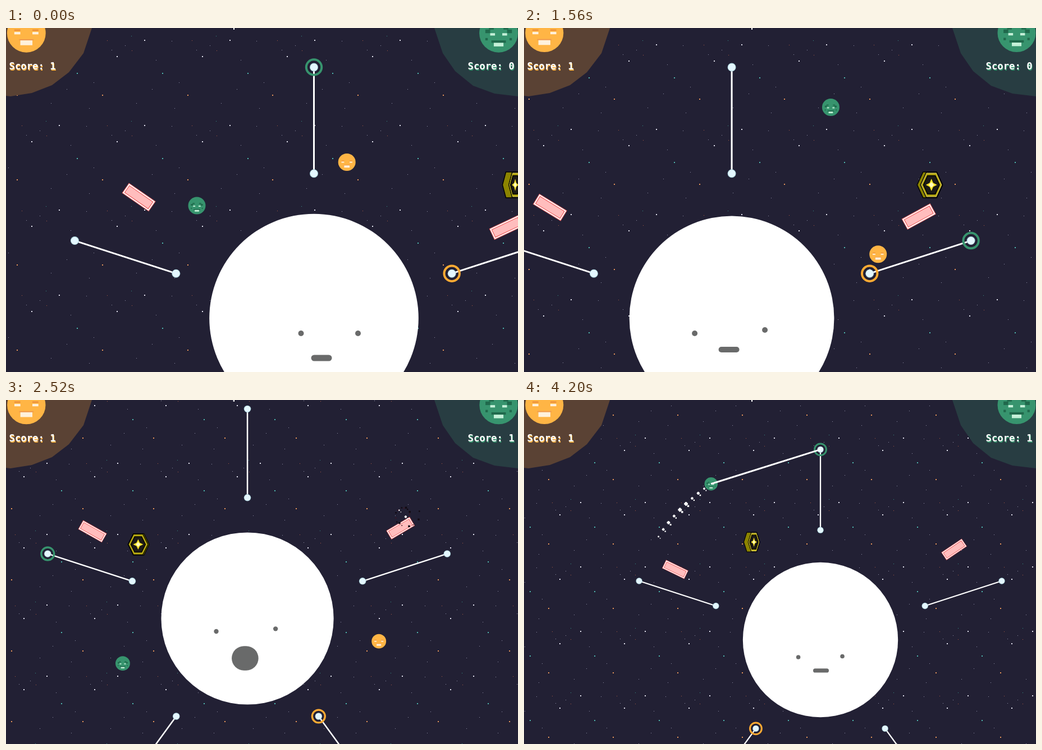
These frames come from a looping animation (912x614 px, 4240 ms). An HTML page with a canvas:

```html
<!DOCTYPE html>
<html lang="en">
<head>
<meta charset="utf-8">
<title>Planet swing</title>
<style>
html, body { margin: 0; width: 100%; height: 100%; overflow: hidden; background: #222034; }
canvas { display: block; width: 912px; height: 614px; }
</style>
</head>
<body>
<canvas id="stage" width="912" height="614"></canvas>
<script>
const ctx = document.getElementById('stage').getContext('2d');
const W = 912, H = 614, LOOP = 4240, STEP = 40;
const ORANGE = '#ffb545', GREEN = '#37946e', INK = '#696a6a';
const SCORED = 2, DIED = 2.1;
const rad = deg => deg * Math.PI / 180;
const polar = (r, deg) => [r * Math.cos(rad(deg)), r * Math.sin(rad(deg))];

// Times in seconds; the world origin is the planet's centre.
const CAMERA = [ // t, x, y, zoom
  [0, -92.5, -211, 1], [.56, -25.5, -211, 1], [1.08, 52, -211, 1],
  [2.04, 101.5, -211, 1], [2.52, 31.1, -99.4, .835], [3, -18, -84, .779],
  [3.52, -71.3, -95.1, .757], [4.2, -95, -159.6, .758], [4.24, -96, -163, .758]
];
const FLIGHT = [
  [0, -208.5, -201], [.28, -172.5, -230.6], [.56, -131.5, -254], [.66, -120, -303],
  [.8, -91, -332], [1.08, 1, -380], [1.3, 85, -420], [1.58, 183, -372],
  [2.04, 326.5, -228.5], [2.1, 343, -212]
];
const RESPAWN = [
  [2.1, -238, 154], [2.52, -266, 96], [2.8, -279, 50], [3.02, -292, 30],
  [3.12, -321, 1], [3.3, -372, -60], [3.52, -420, -145], [3.76, -376, -250],
  [4.2, -257, -367], [4.24, -247, -372]
];
const calm = [-23, 27, 78.5, 27, 13.5, 71, 18.5, 5.5, 5];
const left = [-66, 27, 59, 21, -5, 56, 18.5, 5, 5];
const blink = [-66, 27, 60, 22, -1.5, 71, 10, 8, 0];
const shock = [-66.5, 27.5, 60, 22, -5, 85, 28.5, 26, 5];
const level = [-52, 41, 51.5, 39, 1.3, 72.5, 18.5, 4.8, 5];
const MOOD = [
  [0, ...calm], [.84, ...calm], [1, ...left], [1.9, ...left], [2, ...blink],
  [2.12, ...blink], [2.25, ...shock], [2.8, ...shock], [3, ...level], [4.3, ...level]
];
const TRAILS = [[.62, .8], [1.58, 2.09], [3.02, 3.12], [3.74, 4.2]];
const STARS = [ // x, y inside the tile, size, colour
  [0, 0, 2, '#e8965a'], [75, 54, 2, '#e4e4f0'], [26, 83, 2, '#e4e4f0'], [107, 113, 2, '#4fb8b0'],
  [51, 47, 1, '#37948a'], [8, 55, 1, '#a85a44'], [52, 73, 1, '#a85a44'], [16, 72, 1, '#9090a8'],
  [40, 64, 1, '#9090a8'], [123, 56, 1, '#9090a8'], [60, 15, 1, '#9090a8'], [95, 90, 1, '#9090a8'],
  [136, 130, 1, '#9090a8'], [88, 142, 1, '#9090a8'], [128, 24, 1, '#9090a8']
];
const FACES = { // x, y, w, h in sixteenths of the radius
  [ORANGE]: [
    [-10, -3, 5, 1, '#ea8a3c'], [5, -3, 5, 1, '#ea8a3c'], [-10, -1, 5, 2, '#fff1dc'],
    [5, -1, 5, 2, '#fff1dc'], [-6, 5, 12, 1, '#ef9a50'], [-5, 6, 10, 4, '#fff1dc']
  ],
  [GREEN]: [
    [-11, -3, 4, 3, '#20694c'], [7, -3, 4, 3, '#20694c'], [-8, -5, 4, 2, '#20694c'],
    [4, -5, 4, 2, '#20694c'], [-7, 0, 4, 2, '#c4f0d8'], [3, 0, 4, 2, '#c4f0d8'],
    [-11, 4, 2, 2, '#20694c'], [9, 4, 2, 2, '#20694c'], [-6, 6, 12, 2, '#20694c'],
    [-4, 8, 8, 3, '#c4f0d8']
  ]
};

// Monotone cubic interpolation through the keys.
function sample(keys, t) {
  let i = 1;
  while (i < keys.length - 1 && keys[i][0] < t) i++;
  const a = keys[i - 1], b = keys[i], dt = b[0] - a[0];
  const u = Math.min(1, Math.max(0, (t - a[0]) / dt));
  const rise = (j, c) => keys[j] && keys[j - 1]
    ? (keys[j][c] - keys[j - 1][c]) / (keys[j][0] - keys[j - 1][0]) : null;
  const slope = (j, c) => {
    const p = rise(j, c), q = rise(j + 1, c);
    if (p === null) return q;
    if (q === null) return p;
    return p * q <= 0 ? 0 : 2 * p * q / (p + q);
  };
  return a.slice(1).map((v, n) => {
    const c = n + 1, w = 1 - u;
    return v * w * w * (1 + 2 * u) + b[c] * u * u * (3 - 2 * u)
      + dt * u * w * (w * slope(i - 1, c) - u * slope(i, c));
  });
}

const greenAt = t => sample(t < DIED ? FLIGHT : RESPAWN, t);
const pin = (spoke, outer) => polar(outer ? 448 : 258.3, -90 + 72 * spoke);
const beat = t => Math.exp(-((t + .1401 + 1.22) % 1.22) / .09);

function disc(x, y, r, color) {
  ctx.fillStyle = color;
  ctx.beginPath();
  ctx.arc(x, y, r, 0, 7);
  ctx.fill();
}
function line([x1, y1], [x2, y2], width) {
  ctx.strokeStyle = '#fff';
  ctx.lineWidth = width;
  ctx.beginPath();
  ctx.moveTo(x1, y1);
  ctx.lineTo(x2, y2);
  ctx.stroke();
}
function poly(points, fill, stroke) {
  ctx.beginPath();
  points.forEach(([x, y]) => ctx.lineTo(x, y));
  ctx.closePath();
  ctx.fillStyle = fill;
  ctx.fill();
  if (stroke) {
    ctx.strokeStyle = stroke;
    ctx.lineWidth = 1.5;
    ctx.stroke();
  }
}
function head(x, y, r, color) {
  disc(x, y, r, color);
  const k = r / 16;
  for (const [fx, fy, w, h, c] of FACES[color]) {
    ctx.fillStyle = c;
    ctx.fillRect(x + fx * k, y + fy * k, w * k, h * k);
  }
}

function stars(t, camX, camY, zoom) {
  const tile = 151.7, x0 = -376.5 + 10 * t, y0 = -398.5 + 5 * t;
  const from = (cam, span, o) => Math.floor((cam - span / 2 / zoom - o) / tile) - 1;
  const cols = Math.ceil(W / zoom / tile) + 2, rows = Math.ceil(H / zoom / tile) + 2;
  const i0 = from(camX, W, x0), j0 = from(camY, H, y0);
  for (const [sx, sy, size, color] of STARS) {
    ctx.fillStyle = color;
    const d = Math.max(1, Math.round(size * zoom));
    for (let i = i0; i <= i0 + cols; i++) for (let j = j0; j <= j0 + rows; j++) {
      const x = W / 2 + (x0 + i * tile + sx - camX) * zoom;
      const y = H / 2 + (y0 + j * tile + sy - camY) * zoom;
      ctx.fillRect(Math.round(x - d / 2), Math.round(y - d / 2), d, d);
    }
  }
}

function ring(spoke, outer, color) {
  const [x, y] = pin(spoke, outer);
  ctx.strokeStyle = color;
  ctx.lineWidth = 4;
  ctx.beginPath();
  ctx.arc(x, y, 13.7, 0, 7);
  ctx.stroke();
}
function spokes(t) {
  for (let i = 0; i < 5; i++) line(pin(i, false), pin(i, true), 3);
  if (t < 1.72) ring(1, false, '#ffab33');
  else if (t > 2.1 && t < 3.78) ring(2, false, '#ffab33');
  else if (t > 4.1) ring(3, false, '#ffab33');
  if (t < 1.2 || t > 3.48) ring(0, true, GREEN);
  else if (t < DIED) ring(1, true, GREEN);
  else if (t > 2.2) ring(4, true, GREEN);
  for (let i = 0; i < 10; i++) {
    const [x, y] = pin(i >> 1, i % 2);
    disc(x, y, 7.5, '#9fc9d4');
    disc(x, y, 6.6, '#e4f7ff');
  }
}

function planet(t) {
  const fade = Math.min(1, (t - SCORED) / .4);
  const mix = v => Math.round(v + (255 - v) * fade);
  disc(0, 0, 182.3 + 19 * beat(t), t < SCORED ? '#fff' : `rgb(${mix(55)},${mix(148)},${mix(110)})`);
  const [lx, ly, rx, ry, mx, my, mw, mh, eye] = sample(MOOD, t);
  disc(lx, ly, eye, INK);
  disc(rx, ry, eye, INK);
  ctx.fillStyle = INK;
  ctx.beginPath();
  ctx.roundRect(mx - mw, my - mh, 2 * mw, 2 * mh, Math.min(mw, mh));
  ctx.fill();
}

function coin(x, y, deg) {
  const c = Math.abs(Math.cos(rad(deg))), depth = 6.5 * Math.abs(Math.sin(rad(deg)));
  const hex = (k, spread) => [[-22, 0], [-10.5, -23], [10.5, -23], [22, 0], [10.5, 23], [-10.5, 23]]
    .map(([px, py]) => [px * c * k + Math.sign(px) * spread, py * k]);
  ctx.save();
  ctx.translate(x, y);
  poly(hex(1, depth), '#8c8400', '#000');
  if (c < .15) {
    ctx.fillStyle = '#fff69a';
    ctx.fillRect(-depth + 1, -22, 2 * depth - 2, 22);
    ctx.fillStyle = '#fbf236';
    ctx.fillRect(-depth - 2, -1, 2, 2);
    ctx.fillRect(depth, -1, 2, 2);
  } else {
    ctx.translate(-6.5 * Math.sin(rad(deg)) * Math.sign(Math.cos(rad(deg))), 0);
    poly(hex(.97, 0), depth > 1 ? '#fff08a' : '#8c8400', '#000');
    poly(hex(.9, 0), '#b8aa14');
    poly(hex(.72, 0), '#1c1a16', '#000');
    const star = (a, b) => [[0, -a], [b, -b], [a, 0], [b, b], [0, a], [-b, b], [-a, 0], [-b, -b]]
      .map(([px, py]) => [px * c, py]);
    poly(star(11, 3.5), '#fbe426');
    poly(star(5, 2.5), '#fffbc0');
  }
  ctx.restore();
}

function bumper(deg) {
  ctx.save();
  ctx.rotate(rad(deg));
  ctx.translate(379.4, 0);
  const box = (w, h, fill) => {
    ctx.fillStyle = fill;
    ctx.fillRect(-w / 2, -h / 2, w, h);
  };
  box(58, 22, '#e86060');
  box(56, 20, '#fff');
  box(52, 16, '#ee4a4a');
  box(50, 14, '#ffbdbd');
  ctx.restore();
}

function trail(t) {
  ctx.fillStyle = '#fff';
  for (const [start, end] of TRAILS) {
    for (let e = start, n = 0; e <= end; e += .05, n++) {
      const age = (t - e) / .5;
      if (age <= 0 || age >= 1) continue;
      const [x, y] = greenAt(e), d = 3 + 6 * Math.sin(Math.PI * age) * (n % 3 ? 1 : .6);
      ctx.fillRect(x - d / 2, y - d / 4, d, d / 2);
      ctx.fillRect(x - d / 4, y - d / 2, d / 2, d);
      ctx.fillRect(x + 3, y + 3, d / 2, d / 2);
    }
  }
}
function burst(t) {
  const age = t - DIED;
  if (age < 0 || age > .6) return;
  for (let i = 0; i < 16; i++) {
    const reach = (10 + i * 37 % 23) * Math.min(1, .3 + age * 1.8);
    const [x, y] = polar(reach, i * 137.5), d = 2 + i % 3;
    ctx.fillStyle = i % 3 ? '#120a12' : '#4a1420';
    ctx.fillRect(335 + x, -224 + y, d, d);
  }
}

function players(t) {
  const [ox, oy] = polar(284.6, -78.1 + 34.9 * t);
  head(ox, oy, 15.5, ORANGE);
  trail(t);
  burst(t);
  const green = greenAt(t);
  if (t >= SCORED && t < DIED) disc(...green, 15.5, '#fff');
  else head(...green, 15.5, GREEN);
  const inside = (a, b) => t >= a && t < b;
  if (inside(.52, .62) || inside(.8, 1.06) || t > 4.17) line(pin(0, true), green, 4);
  else if (inside(3.12, 3.5)) line(pin(4, true), green, 4);
}

function label(text, x, color) {
  ctx.font = 'bold 17.3px "DejaVu Sans Mono", monospace';
  ctx.fillStyle = color;
  ctx.fillText(text, x + 1, 75.5);
  ctx.fillStyle = '#fff';
  ctx.fillText(text, x, 74);
}
function hud(t) {
  poly([[0, 0], [153, 0], [138, 45], [112, 79], [82, 102], [46, 116], [8, 122], [0, 121]], '#5a4234');
  poly([[912, 0], [763, 0], [778, 45], [800, 77], [832, 103], [870, 117], [912, 122]], '#283d42');
  const p = beat(t);
  head(36.3, 9 + p, 34 + 2 * p, ORANGE);
  head(877.5, 9 + p, 34 + 2 * p, GREEN);
  label('Score: 1', 5.5, ORANGE);
  label('Score: ' + (t < SCORED ? 0 : 1), 822.5, GREEN);
  ctx.fillStyle = '#fff';
  ctx.fillRect(405, 0, 2, 3);
}

function draw(t) {
  const [camX, camY, zoom] = sample(CAMERA, t);
  ctx.setTransform(1, 0, 0, 1, 0, 0);
  ctx.fillStyle = '#222034';
  ctx.fillRect(0, 0, W, H);
  stars(t, camX, camY, zoom);
  ctx.setTransform(zoom, 0, 0, zoom, W / 2 - camX * zoom, H / 2 - camY * zoom);
  spokes(t);
  planet(t);
  if (t < SCORED) coin(353, -238, -58 + 137 * t);
  else coin(...polar(281, 208.4 + 12.3 * (t - 2.04)), 393 * (t - 2.04));
  for (let i = 0; i < 3; i++) bumper(214.7 + 120 * i - 2.1 * t);
  players(t);
  ctx.setTransform(1, 0, 0, 1, 0, 0);
  hud(t);
}

const began = performance.now();
function tick() {
  const ms = (performance.now() - began) % LOOP;
  draw(Math.floor(ms / STEP) * STEP / 1000);
  requestAnimationFrame(tick);
}
tick();
</script>
</body>
</html>
```
